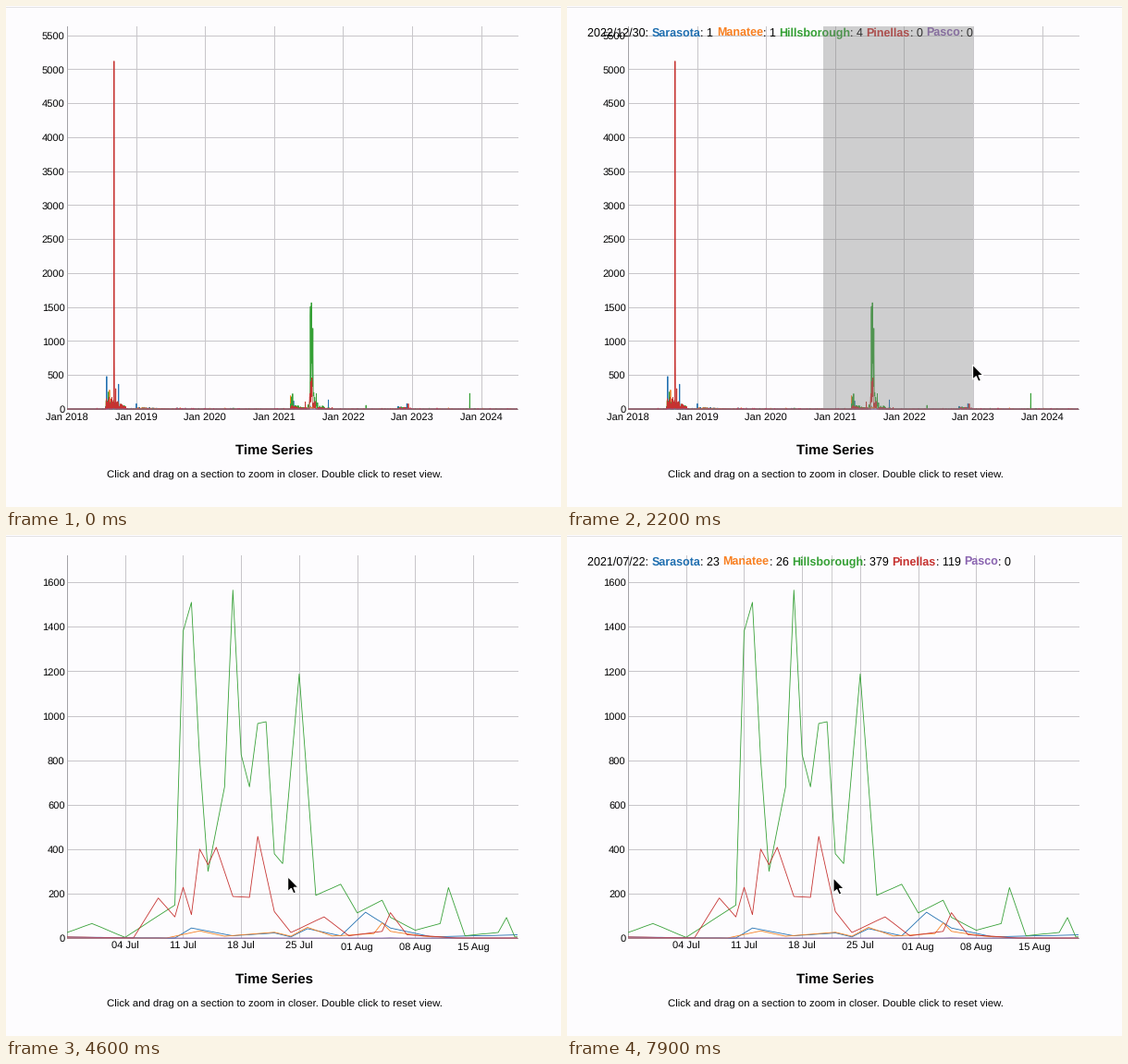
A matplotlib script for the animation above (8000 ms loop, 600x542 px).

```python
import numpy as np
import matplotlib
import matplotlib.pyplot as plt
from matplotlib.animation import FuncAnimation
from matplotlib.patches import Polygon, Rectangle

matplotlib.rcParams.update({
    "font.family": "Liberation Sans",
    "text.hinting": "none",
    "toolbar": "None",
})

W, H, DPI = 600, 542, 100
STEP, LOOP = 100, 8000
LEFT, RIGHT, TOP, BASE = 66, 553, 22, 436
PX = 72 / DPI
NAMES = ["Sarasota", "Manatee", "Hillsborough", "Pinellas", "Pasco"]
COLORS = ["#206fb0", "#f88022", "#35a035", "#c63230", "#8a64b0"]
BLUE, ORANGE, GREEN, RED, PURPLE = range(5)
EPOCH = np.datetime64("2018-01-01")
DAYS = 2385


def day_of(date):
    return int((np.datetime64(date, "D") - EPOCH).astype(int))


SUMMER = day_of("2021-06-27")


# ---- data ----------------------------------------------------------
def make_data():
    rng = np.random.default_rng(7)
    data = np.zeros((5, DAYS))
    quiet = rng.random((4, DAYS)) > 0.05
    data[:4] = np.where(quiet, 0, rng.exponential(4, (4, DAYS)))
    data[:, :155] = 0

    # decaying outbreaks: first day, last day, peak of each series
    for a, b, peaks in [
        (205, 310, (180, 120, 200, 230)), (366, 540, (30, 25, 0, 0)),
        (1184, 1273, (10, 10, 80, 60)), (1328, 1400, (15, 20, 60, 28)),
        (1752, 1823, (40, 5, 35, 50)),
    ]:
        shape = np.linspace(1, 0.2, b - a) * rng.random((4, b - a)) ** 3
        data[:4, a:b] += np.outer(peaks, np.ones(b - a)) * shape

    # single-day spikes
    for s, pts in {
        BLUE: [(210, 480), (273, 365), (367, 80), (1199, 120), (1383, 135), (1798, 80)],
        ORANGE: [(225, 280), (1183, 195)],
        GREEN: [(219, 250), (1189, 180), (1194, 225), (1582, 55), (2131, 230)],
        RED: [(249, 5120), (250, 750), (258, 300), (1261, 105), (1806, 78)],
    }.items():
        for d, v in pts:
            data[s, d] = v

    # the main wave, straight runs between turning points
    span = np.arange(56)
    for s, pts in {
        GREEN: [(0, 25), (3, 65), (7, 3), (13, 148), (14, 1380), (15, 1510), (16, 800),
                (17, 300), (19, 680), (20, 1565), (21, 825), (22, 680), (23, 965),
                (24, 973), (25, 379), (26, 335), (28, 1188), (30, 192), (33, 242),
                (35, 113), (38, 170), (39, 93), (42, 35), (45, 65), (46, 227),
                (48, 10), (52, 25), (53, 92), (54, 5)],
        RED: [(0, 5), (8, 0), (11, 180), (13, 95), (14, 228), (15, 105), (16, 400),
              (17, 330), (18, 408), (20, 187), (22, 183), (23, 457), (25, 119),
              (27, 25), (31, 95), (34, 10), (38, 30), (39, 114), (41, 15), (47, 0)],
        BLUE: [(0, 4), (13, 0), (15, 45), (20, 10), (25, 23), (27, 5), (29, 42),
               (33, 10), (36, 116), (39, 45), (44, 5), (55, 15)],
        ORANGE: [(12, 0), (16, 32), (19, 8), (25, 26), (27, 8), (29, 48), (32, 9),
                 (37, 20), (38, 68), (39, 30), (43, 8), (47, 0)],
    }.items():
        data[s, SUMMER:SUMMER + 56] = np.interp(span, *zip(*pts))

    for date, counts in {"2021-05-05": (2, 0, 1, 0), "2022-12-30": (1, 1, 4, 0),
                         "2023-09-06": (4, 0, 0, 0)}.items():
        data[:4, day_of(date)] = counts
    data[PURPLE, day_of("2021-08-05")] = 1
    return np.round(data)


DATA = make_data()


# ---- stage ---------------------------------------------------------
fig = plt.figure(figsize=(W / DPI, H / DPI), dpi=DPI, facecolor="#fdfcfe")
ax = fig.add_axes([0, 0, 1, 1])
ax.set(xlim=(0, W), ylim=(H, 0))
ax.axis("off")


def label(x, y, s, px, **kw):
    return ax.text(x, y, s, fontsize=px * PX, va="baseline", **kw)


def rule(xs, ys, color="#c8c6ca"):
    return ax.plot(xs, ys, color=color, lw=PX, zorder=1)[0]


def ticks(first, last, step=1):
    return np.arange(np.datetime64(first), np.datetime64(last), step)


class View:
    def __init__(self, lo, hi, top, step, dates, fmt):
        self.lo, self.hi, self.top = lo, hi, top
        self.scale = (RIGHT - LEFT) / (hi - lo)
        self.parts = []
        add = self.parts.append
        for v in range(0, int(top), step):
            y = self.y(v)
            if v:
                add(rule([LEFT, RIGHT], [y, y]))
            add(label(63.5, y + 4, str(v), 11.15, ha="right"))
        for date in dates.astype("M8[D]"):
            x = self.x(day_of(date))
            add(rule([x, x], [TOP, BASE]))
            add(label(x, 448.3, date.item().strftime(fmt), 11.15, ha="center"))
        clip = Rectangle((LEFT, TOP), RIGHT - LEFT, BASE - TOP + 2,
                         transform=ax.transData)
        days = np.arange(max(0, int(lo) - 1), min(DAYS, int(hi) + 3))
        for row, color in zip(DATA, COLORS):
            line, = ax.plot(self.x(days), self.y(row[days]), color=color, lw=0.6,
                            solid_joinstyle="round", zorder=3)
            line.set_clip_path(clip)
            add(line)

    def x(self, day):
        return LEFT + (day - self.lo) * self.scale

    def y(self, value):
        return BASE - value * (BASE - TOP) / self.top

    def day(self, x):
        d = self.lo + (x - LEFT) / self.scale
        return int(np.clip(round(d), np.ceil(self.lo), np.floor(self.hi)))

    def show(self, on):
        for p in self.parts:
            p.set_visible(on)


LOW = 1565 * 1.1
VIEWS = [
    View(0, 2384, 5120 * 1.1, 500, ticks("2018", "2025"), "%b %Y"),
    View(1031, 1823.5, LOW, 200, ticks("2021-01", "2022-12", 6), "%b %Y"),
    View(1199.4, 1460.5, LOW, 200, ticks("2021-07", "2022-01", 3), "%b %Y"),
    View(SUMMER, SUMMER + 54.33, LOW, 200,
         ticks("2021-07-04", "2021-08-16", 7), "%d %b"),
]
ZOOMS = [2400, 3600, 4500]

rule([0, W], [0.5, 0.5], "#e4e2e6")
rule([LEFT, LEFT], [TOP, BASE], "#a3a2a6")
rule([LEFT, RIGHT], [BASE, BASE], "#a3a2a6")
label(290, 485.7, "Time Series", 15, ha="center", weight="bold")
label(290, 510.7, "Click and drag on a section to zoom in closer. "
      "Double click to reset view.", 11.33, ha="center")

# ---- pointer, selection, legend ------------------------------------
ARROW = np.array([(0, 0), (0, 16), (3.7, 12.6), (6.2, 18.2), (8.8, 17.1),
                  (6.4, 11.6), (11.4, 11.6)])
pointer = Polygon(ARROW, fc="black", ec="white", lw=0.8, zorder=9)
ax.add_patch(pointer)
select = Rectangle((0, TOP), 0, BASE - TOP, fc="#808080", alpha=0.37, lw=0, zorder=7)
ax.add_patch(select)
dots = [ax.plot([], [], "o", color=c, ms=6 * PX, mew=0, zorder=6)[0] for c in COLORS]

legend = [label(22, 33.3, "", 12.5, zorder=5)]
for color in COLORS:
    legend.append(label(0, 33.3, "", 12.5, color=color, weight="bold", zorder=5))
    legend.append(label(0, 33.3, "", 12.5, zorder=5))

# pointer stops: time, x, y
PATH = np.array([
    (100, 345, 452), (700, 277, 330), (900, 278, 335), (1400, 490.8, 367),
    (1500, 488, 368), (2100, 438.6, 388), (2300, 438.6, 388), (2900, 172, 338),
    (3100, 174, 346), (3200, 194, 354), (3500, 329, 366), (3600, 330, 366),
    (3900, 204, 350), (4400, 304, 369), (4700, 305, 370), (5200, 246, 300),
    (6300, 410, 400), (6700, 418, 404), (7200, 420, 404), (7800, 287, 371),
    (7900, 288, 371),
])
DRAGS = [(900, 2400, 277), (3000, 3600, 170), (3900, 4500, 204), (7800, LOOP, 286)]
HOVERS = [(300, 2400), (2500, 4500), (4800, LOOP)]
LAG = 60  # the page trails the pointer slightly


def path_at(t):
    return [np.interp(t, PATH[:, 0], PATH[:, k]) for k in (1, 2)]


def width(text):
    """Advance of a text, trailing spaces included."""
    r = fig.canvas.get_renderer()
    font = text.get_fontproperties()
    full, bare = (r.get_text_width_height_descent(s, font, False)[0]
                  for s in ("|" + text.get_text() + "|", "||"))
    return full - bare


def set_legend(day):
    words = [(EPOCH + day).item().strftime("%Y/%m/%d: ")]
    for name, row in zip(NAMES, DATA):
        words += [name, f": {int(row[day])} "]
    x = 22
    for text, word in zip(legend, words):
        text.set_text(word)
        text.set_x(x)
        x += width(text)


def draw(i):
    t = i * STEP
    now = sum(t >= z for z in ZOOMS)
    view = VIEWS[now]
    for k, v in enumerate(VIEWS):
        v.show(k == now)

    pointer.set_visible(t >= PATH[0, 0])
    pointer.set_xy(ARROW + path_at(t))

    x = path_at(t - LAG)[0]
    start = next((x0 for a, b, x0 in DRAGS if a <= t < b), None)
    select.set_visible(start is not None)
    if start is not None:
        select.set_x(min(start, x))
        select.set_width(max(abs(x - start), 1))

    hover = any(a <= t < b for a, b in HOVERS)
    day = view.day(x)
    if hover:
        set_legend(day)
    for text in legend:
        text.set_visible(hover)
    for dot, row in zip(dots, DATA):
        dot.set_visible(hover and start is None)
        dot.set_data([view.x(day)], [view.y(row[day])])
    return []


anim = FuncAnimation(fig, draw, frames=LOOP // STEP, interval=STEP,
                     repeat=True, repeat_delay=0, blit=False)
plt.show()
```
